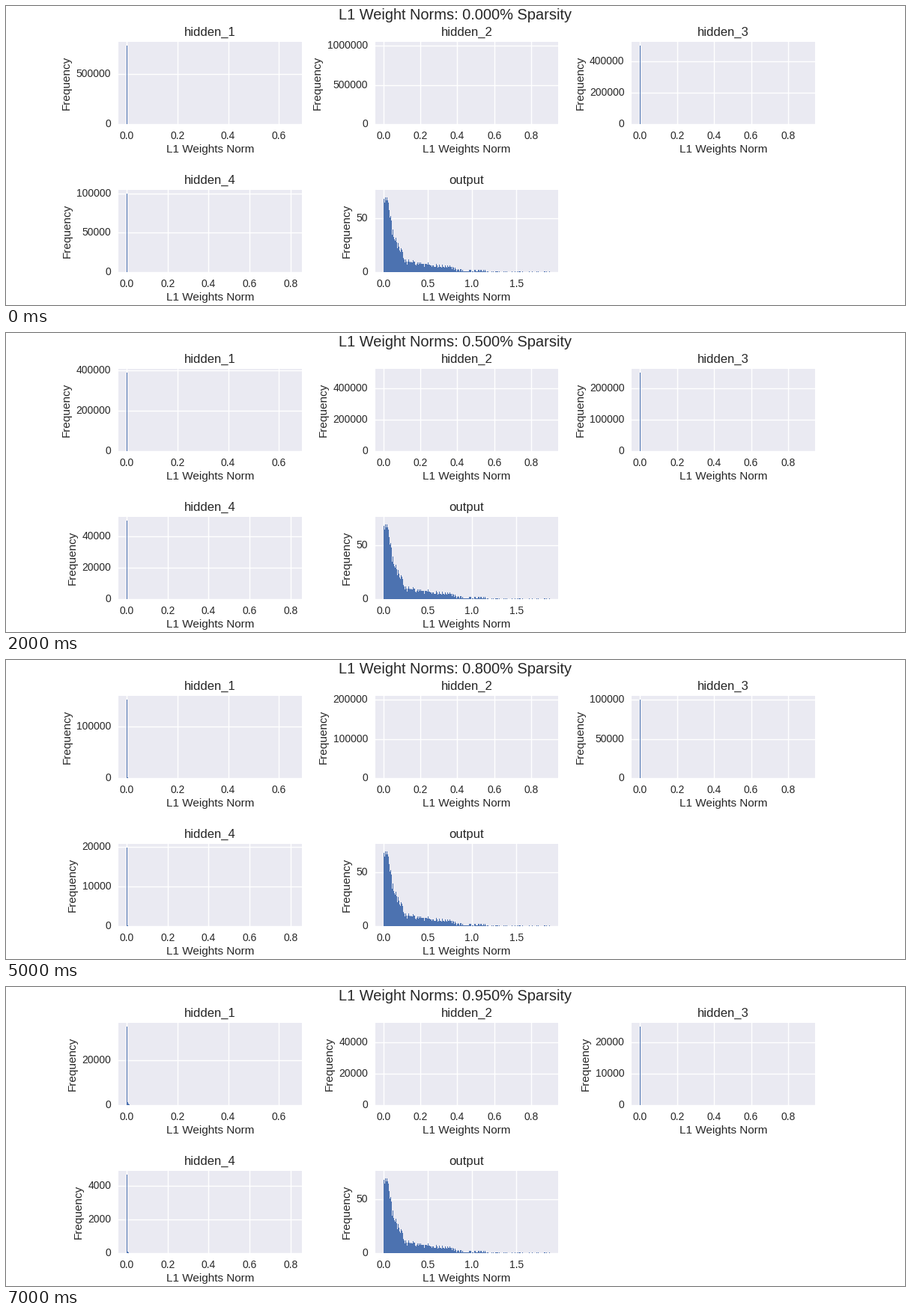
A matplotlib script that plays this animation: 1200x400 px, repeating every 8 s.

```python
import numpy as np
import matplotlib.pyplot as plt
from matplotlib.animation import FuncAnimation
from matplotlib.ticker import FuncFormatter

BLUE = "#4c72b0"
BINS = 500
SPARSITY = [0, 0.25, 0.5, 0.6, 0.7, 0.8, 0.9, 0.95]

plt.rcParams.update({
    "font.family": "Liberation Sans", "font.size": 12,
    "text.color": "0.15", "axes.labelcolor": "0.15",
    "xtick.color": "0.15", "ytick.color": "0.15",
    "axes.facecolor": "#eaeaf2", "axes.linewidth": 0, "axes.axisbelow": True,
    "axes.titlesize": 12, "axes.labelsize": 11,
    "xtick.labelsize": 10, "ytick.labelsize": 10,
    "xtick.major.size": 0, "ytick.major.size": 0,
    "xtick.major.pad": 6.28, "ytick.major.pad": 7,
    "ytick.alignment": "center",
    "axes.grid": True, "grid.color": "white", "grid.linewidth": 1,
})

fig = plt.figure(figsize=(12, 4), dpi=100, facecolor="white")
fig.subplots_adjust(left=0.125, right=0.9, bottom=0.11, top=0.88,
                    wspace=0.4, hspace=0.8)
title = fig.suptitle("", y=0.9925, fontsize=14.4)


def panel(slot, name, x_max, counts):
    """Histogram panel; thin bins snap to whole pixels or vanish."""
    ax = fig.add_subplot(2, 3, slot)
    ax.set_title(name)
    ax.set_xlabel("L1 Weights Norm", labelpad=3.28)
    ax.set_ylabel("Frequency")
    ax.yaxis.set_major_formatter(FuncFormatter(lambda v, _: f"{v:.0f}"))
    width = x_max / BINS
    bars = ax.bar(np.arange(len(counts)) * width, counts, width,
                  align="edge", color=BLUE, linewidth=0)
    ax.set_xlim(-0.05 * x_max, 1.05 * x_max)
    return ax, bars


def output_counts(x_max, peak):
    """Noisy counts around a falling curve given by a few key points."""
    norm = np.arange(BINS) * x_max / BINS
    mean = np.interp(norm,
                     [0, 0.02, 0.05, 0.08, 0.12, 0.17, 0.21, 0.23, 0.45, 0.75, 0.9, 1.3, 1.85],
                     [66, 70, 66, 52, 34, 23, 20, 11, 7.5, 4.5, 1.5, 0.5, 0.15])
    rng = np.random.default_rng(7)
    noise = 0.5 * np.sqrt(mean) * rng.standard_normal(BINS)
    return np.clip(np.floor(mean + noise + rng.random(BINS)), 0, peak)


# name, widest norm, number of weights, weights outside the first bin
LAYERS = [
    ("hidden_1", 0.657, 784000, 4000),
    ("hidden_2", 0.902, 1000000, 100),
    ("hidden_3", 0.901, 500000, 60),
    ("hidden_4", 0.814, 100000, 320),
]

layers = []
for slot, (name, x_max, total, rest) in enumerate(LAYERS, 1):
    ax, bars = panel(slot, name, x_max, rest * 0.67 ** np.arange(12))
    layers.append((ax, bars[0], total, rest))

PEAK = 73
out, _ = panel(5, "output", 1.881, output_counts(1.881, PEAK))
out.set_ylim(0, PEAK * 1.05)


def update(i):
    s = SPARSITY[i]
    title.set_text(f"L1 Weight Norms: {s:.3f}% Sparsity")
    for ax, spike, total, rest in layers:
        peak = total * (1 - s) - rest
        spike.set_height(peak)
        ax.set_ylim(0, peak * 1.05)


anim = FuncAnimation(fig, update, frames=len(SPARSITY), interval=1000,
                     init_func=lambda: update(0), repeat=True, blit=False)
plt.show()
```
